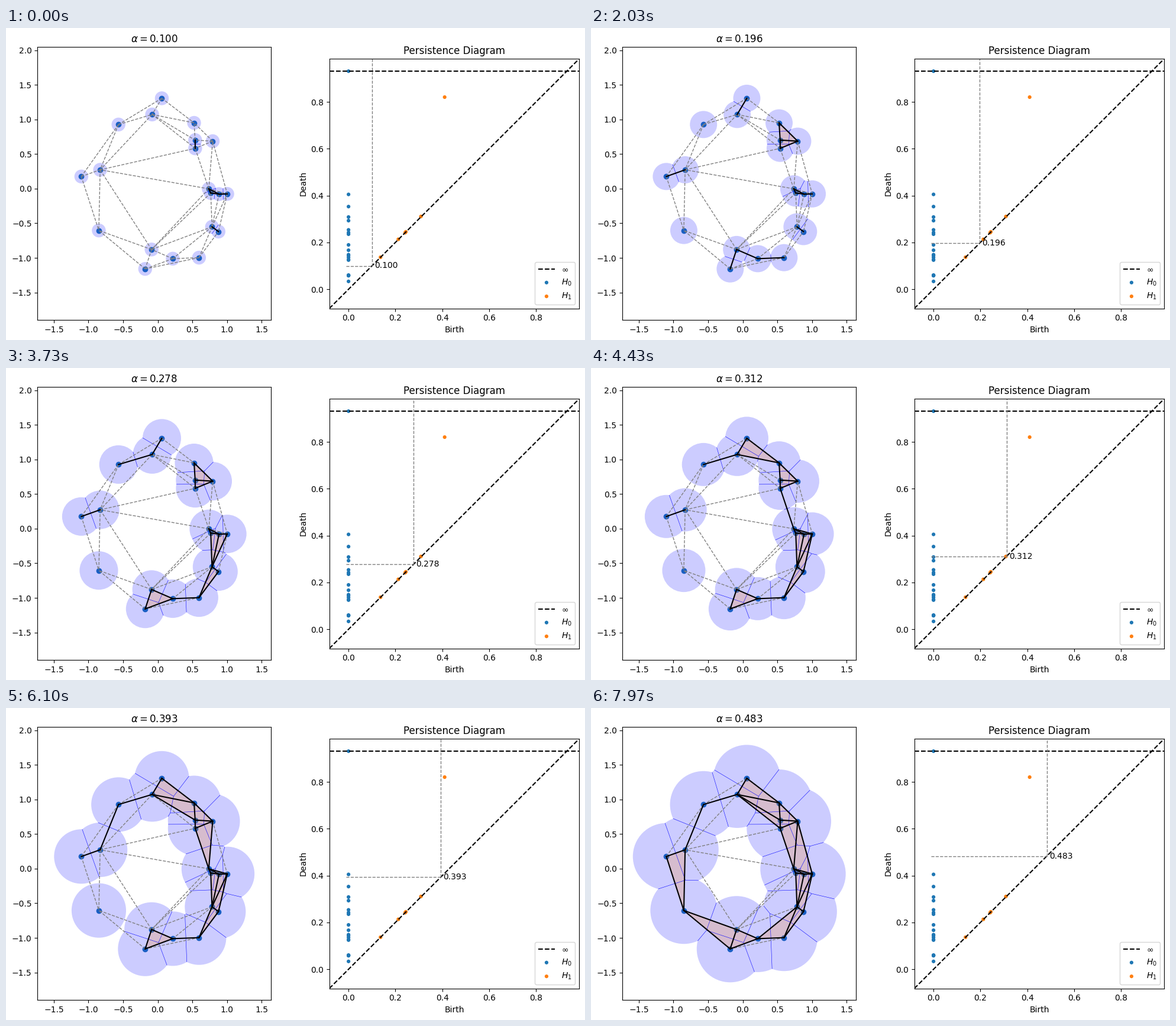
A matplotlib script for the animation above (8000 ms loop, 979 px wide and 528 px high).

```python
import itertools

import matplotlib.pyplot as plt
import numpy as np
from matplotlib.animation import FuncAnimation
from matplotlib.collections import LineCollection, PolyCollection
from matplotlib.patches import Circle
from matplotlib.tri import Triangulation

W, H, DPI = 979, 528, 100
FRAMES = 240
ALPHAS = np.linspace(0.1, 0.9, 500)[:FRAMES]


def noisy_circle(n, noise):
    np.random.seed(0)
    pts = np.random.randn(n, 2)
    pts /= np.linalg.norm(pts, axis=1, keepdims=True)
    return pts + noise * np.random.randn(n, 2)


def circumcircle(a, b, c):
    m = 2 * np.array([b - a, c - a])
    center = np.linalg.solve(m, [b @ b - a @ a, c @ c - a @ a])
    return center, np.hypot(*(center - a))


def alpha_complex(pts):
    """Return edges as (i, j, value, dual) and triangles as (corners, value)."""
    tris, sides = [], {}
    for t in Triangulation(*pts.T).triangles:
        center, rad = circumcircle(*pts[t])
        tris.append((sorted(t), rad))
        for i, j in itertools.combinations(sorted(t), 2):
            k = (set(t) - {i, j}).pop()
            sides.setdefault((i, j), []).append((pts[k], center, rad))
    edges = []
    for (i, j), adj in sides.items():
        mid, d = (pts[i] + pts[j]) / 2, pts[j] - pts[i]
        half = np.hypot(*d) / 2
        n = np.array([-d[1], d[0]]) / (2 * half)
        if len(adj) == 1 and (adj[0][0] - mid) @ n > 0:
            n = -n
        ends = [(c - mid) @ n for _, c, _ in adj]
        if len(adj) == 1:
            ends.append(np.inf)
        blocked = any(np.hypot(*(q - mid)) < half for q, _, _ in adj)
        value = min(r for _, _, r in adj) if blocked else half
        edges.append((i, j, value, (mid, n, half, min(ends), max(ends))))
    edges.sort(key=lambda e: e[2])
    tris.sort(key=lambda t: t[1])
    return edges, tris


def pair(columns):
    """Reduce a boundary matrix mod 2; return (row, column) pivots."""
    owner, pivots = {}, []
    for n, col in enumerate(columns):
        col = set(col)
        while col and max(col) in owner:
            col ^= owner[max(col)]
        if col:
            owner[max(col)] = col
            pivots.append((max(col), n))
    return pivots


def persistence(edges, tris):
    index = {(i, j): n for n, (i, j, _, _) in enumerate(edges)}
    h0 = [edges[n][2] for _, n in pair((i, j) for i, j, _, _ in edges)]
    loops = pair([index[s] for s in itertools.combinations(t, 2)]
                 for t, _ in tris)
    h1 = np.array([(edges[e][2], tris[n][1]) for e, n in loops])
    return h0, h1[h1[:, 1] - h1[:, 0] > 1e-9]


def dual_segments(edges, r):
    segs = []
    for _, _, _, (mid, n, half, lo, hi) in edges:
        if r > half:
            h = np.sqrt(r * r - half * half)
            lo, hi = max(lo, -h), min(hi, h)
            if lo < hi:
                segs.append([mid + lo * n, mid + hi * n])
    return segs


P = noisy_circle(20, 0.2)
edges, tris = alpha_complex(P)
deaths, loops = persistence(edges, tris)

fig = plt.figure(figsize=((W + 0.01) / DPI, (H + 0.01) / DPI), dpi=DPI,
                 facecolor="white")


def add_axes(x):
    axes = fig.add_axes([x / W, 33.68 / H, 422.73 / W, 462 / H])
    axes.set_aspect("equal")
    return axes


def add_lines(axes, color, width, z, **style):
    return axes.add_collection(LineCollection(
        [], colors=color, linewidths=width, zorder=z, **style))


# Point cloud with growing balls
ax = add_axes(39.36)
pad = 0.3 * np.ptp(P, axis=0)
(x0, y0), (x1, y1) = P.min(axis=0) - pad, P.max(axis=0) + pad
ax.set(xlim=(x0, x1), ylim=(y0, y1),
       xticks=np.arange(-1.5, 1.6, 0.5), yticks=np.arange(-1.5, 2.1, 0.5))
balls = [ax.add_patch(Circle(p, 0.1, fc="#ccccff", ec="none", zorder=0.5))
         for p in P]
ax.scatter(*P.T, color="#195fc3", zorder=1)
fills = ax.add_collection(PolyCollection([], facecolors="C1", alpha=0.2,
                                         edgecolors="none", zorder=1.2))
duals = add_lines(ax, "blue", 0.4, 1.8)
dashed = add_lines(ax, "gray", 1, 2, linestyles="--")
solid = add_lines(ax, "black", 1.5, 2.1, capstyle="projecting")
title = ax.set_title("")

# Persistence diagram
pd = add_axes(546.63)
lo, hi = loops.max() * np.array([-0.1, 1.2])
inf = lo + 0.95 * (hi - lo)
deaths.append(inf)
pd.plot([lo, hi], [lo, hi], "--", c="k")
pd.plot([lo, hi], [inf, inf], "--", c="k", label=r"$\infty$")
pd.scatter(np.zeros(len(deaths)), deaths, 20, label="$H_0$", edgecolor="none")
pd.scatter(*loops.T, 20, label="$H_1$", edgecolor="none")
pd.set(xlim=(lo, hi), ylim=(lo, hi), xlabel="Birth", ylabel="Death",
       title="Persistence Diagram",
       xticks=np.arange(0, 0.9, 0.2), yticks=np.arange(0, 0.9, 0.2))
pd.legend(loc="lower right")
across, = pd.plot([], [], "--", c="gray", lw=1)
up, = pd.plot([], [], "--", c="gray", lw=1)
label = pd.text(0, 0, "")


def update(frame):
    a = ALPHAS[frame]
    for ball in balls:
        ball.set_radius(a)
    fills.set_verts([P[t] for t, value in tris if value <= a])
    duals.set_segments(dual_segments(edges, a))
    solid.set_segments([P[[i, j]] for i, j, v, _ in edges if v <= a])
    dashed.set_segments([P[[i, j]] for i, j, v, _ in edges if v > a])
    title.set_text(rf"$\alpha = {a:.3f}$")
    across.set_data([-0.01, a], [a, a])
    up.set_data([a, a], [a, 1])
    label.set_position((a + 0.01, a - 0.01))
    label.set_text(f"{a:.3f}")


anim = FuncAnimation(fig, update, frames=FRAMES, interval=8000 / FRAMES,
                     repeat=True, repeat_delay=0)
plt.show()
```
